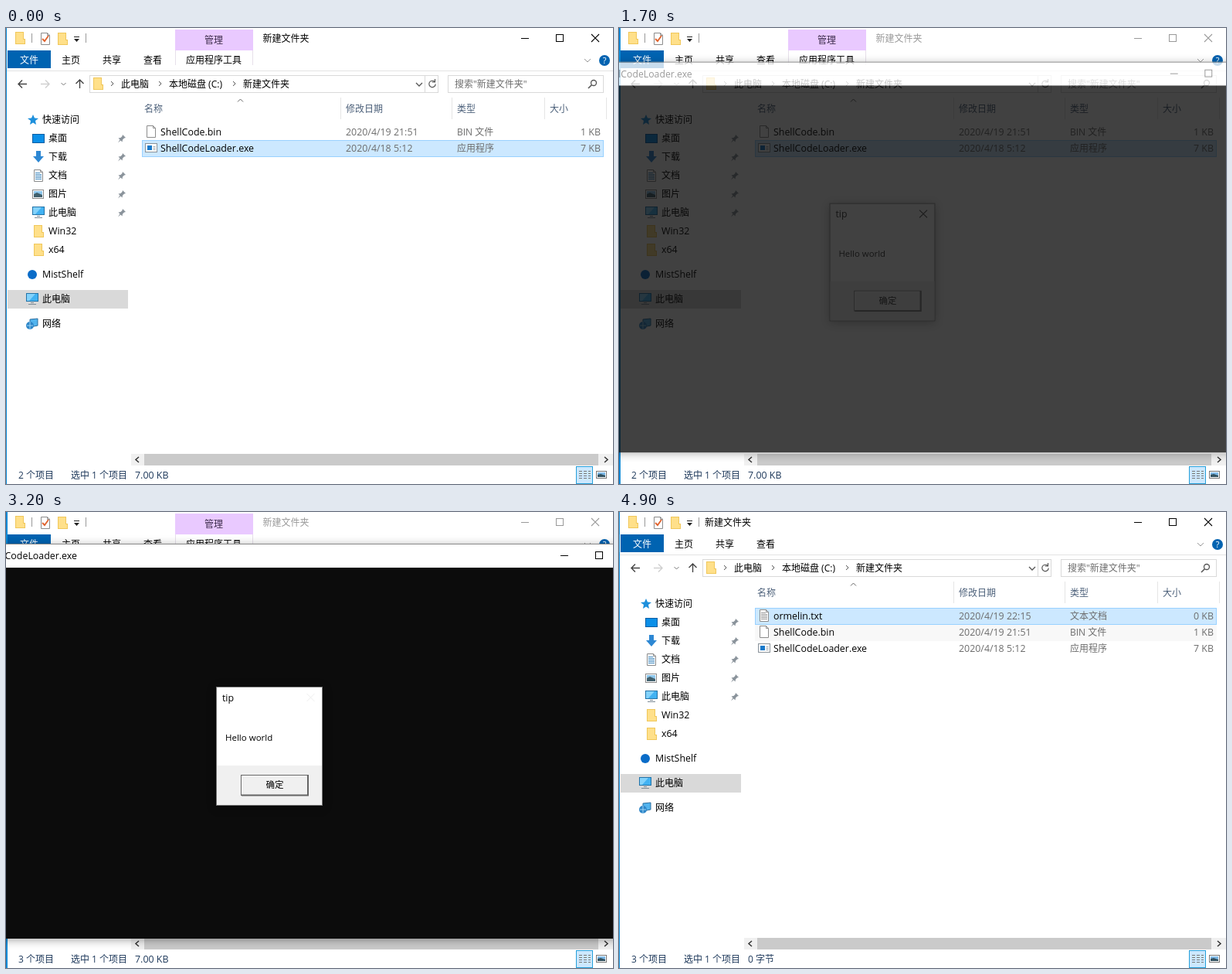
Write an HTML page that moves like this. It is 786 px wide and 590 px high and loops after 5.2 s.

```html
<!DOCTYPE html>
<html lang="zh-CN">
<head>
<meta charset="utf-8">
<style>
html, body { margin: 0; width: 100%; height: 100%; overflow: hidden; background: #fff; }
svg { display: block; }
text { font-family: "Open Sans", "Noto Sans CJK SC", "Noto Sans CJK", sans-serif; }
.window { filter: drop-shadow(0 2px 6px rgba(0, 0, 0, .35)); }
</style>
</head>
<body>
<svg id="stage" width="786" height="590" viewBox="0 0 786 590">
  <g id="explorer"></g>
  <g id="live"></g>
  <g id="tooltip"></g>
  <g id="dialog" class="window"></g>
  <g id="console" class="window"></g>
</svg>
<script>
const $ = id => document.getElementById(id);
const GREY = '#6d6d6d', BLUE = '#0063b1', NAVY = '#1e395b', HEAD = '#4c607a';

// Drawing helpers: text is placed by its vertical middle
const text = (x, y, s, fill = '#000', anchor = 'start', size = /[^\x00-\x7f]/.test(s) ? 12 : 12.4) =>
  `<text x="${x}" y="${y + 5}" fill="${fill}" text-anchor="${anchor}" font-size="${size}">${s}</text>`;
const rect = (x, y, w, h, fill, stroke = 'none') =>
  `<rect x="${x}" y="${y}" width="${w}" height="${h}" fill="${fill}" stroke="${stroke}"/>`;
const line = (d, stroke, width = 1) => `<path d="${d}" fill="none" stroke="${stroke}" stroke-width="${width}"/>`;
const shape = (d, fill) => `<path d="${d}" fill="${fill}"/>`;
const at = (x, y, s) => `<g transform="translate(${x} ${y})">${s}</g>`;
const cross = (x, y, color) => line(`M${x - 5} ${y - 5}l10 10m0 -10l-10 10`, color, 1.1);
const minMax = (x, y, color) =>
  line(`M${x} ${y + .5}h10`, color) + rect(x + 45.5, y - 4.5, 9, 9, 'none', color);

// Icons
const folder = (x, y) => at(x, y,
  shape('M0 0h11v9h2v7h-13z', '#f0c75a') + shape('M1 1h9v9h2v5h-11z', '#ffe08a'));
const page = (x, y, lines = '') => at(x, y,
  shape('M.5 .5h8l3 3v12h-11z', '#fff') + line('M.5 .5h8l3 3v12h-11zM8.5 .5v3h3', '#8c8c8c') +
  (lines && line('M2 4.5h6M2 6.5h8M2 8.5h8M2 10.5h8M2 12.5h8', lines)));
const screen = (x, y) => at(x, y,
  rect(.5, .5, 15, 10, '#42b2f2', '#2273a8') + shape('M1 1h11l-8 9h-3z', '#83d2fb') + line('M6 12.5h4M3 14.5h10', '#7d8b96'));
const picture = (x, y) => at(x, y,
  rect(.5, .5, 14, 11, '#fff', '#8a8a8a') + rect(2, 2, 11, 8, '#8dc6ec') + shape('M2 6l4 -2 7 3v3h-11z', '#41606d'));
const app = (x, y) => at(x, y,
  rect(.5, .5, 15, 11, '#fff', '#8a9299') + rect(3, 3, 6, 6, '#1979ca') + line('M10.5 4.5h3M10.5 6.5h3M10.5 8.5h3', '#9aa5ad'));
const pin = y => at(150, y, shape('M1 -5l4 4 -2 .5 -2 2 -.5 3 -2 -2 -3.5 3 2.5 -4 -2 -2 3 -.5 2 -2z', '#8a939b'));

function explorerBase() {
  const tabs = ['主页', '共享', '查看'].map((s, i) => text(72 + 53 * i, 41, s)).join('');
  const crumbs = [[149, '此电脑'], [211, '本地磁盘 (C:)'], [307, '新建文件夹']]
    .map(([x, s]) => line(`M${x - 13} 69l3 3 -3 3`, '#555') + text(x, 72, s)).join('');
  const heads = [[179, '名称', 433], [440, '修改日期', 577], [584, '类型', 697], [704, '大小', 777]]
    .map(([x, s, edge]) => text(x, 104, s, HEAD) + rect(edge, 90, 1, 28, '#e5e5e5')).join('');
  const places = ['桌面', '下载', '文档', '图片', '此电脑', 'Win32', 'x64']
    .map((s, i) => text(55, 142 + 24 * i, s) + (i < 5 ? pin(143 + 24 * i) : '')).join('');
  return rect(0, 0, 786, 590, '#fff') +
    folder(12, 5) + rect(33, 7, 1, 12, '#999') + page(45, 6) + line('M47 14l3 3 5 -7', '#e0622c', 1.8) + folder(67, 6) +
    rect(88, 11, 7, 1, '#222') + shape('M88 14h7l-3.5 4z', '#222') + rect(103, 7, 1, 12, '#999') +
    rect(2, 29, 56, 23, BLUE) + text(18, 41, '文件', '#fff') + tabs +
    line('M749 40l4 4 4 -4', '#999') + `<circle cx="775" cy="42" r="7" fill="${BLUE}"/>` +
    text(775, 41, '?', '#fff', 'middle', 11) + rect(1, 55, 785, 1, '#e4e4e4') +
    line('M27 72.5h-11m5 -5l-5 5 5 5', '#444', 1.4) + line('M45 72.5h11m-5 -5l5 5 -5 5', '#d0d0d0', 1.4) +
    line('M71.5 71l3 3 3 -3', '#777') + line('M95.5 78v-11m-5 5l5 -5 5 5', '#444', 1.4) +
    rect(108.5, 61.5, 451, 22, '#fff', '#d9d9d9') + rect(542, 62, 1, 21, '#d9d9d9') + folder(113, 64) + crumbs +
    line('M531 71l4 4 4 -4', '#555', 1.3) + line('M555 69.5a4.2 4.2 0 1 0 1.2 3M555.5 66v4h-4', '#555', 1.2) +
    rect(572.5, 61.5, 201, 22, '#fff', '#d9d9d9') + text(581, 72, '搜索"新建文件夹"', GREY) +
    `<circle cx="761" cy="71" r="3.5" fill="none" stroke="#555" stroke-width="1.3"/>` + line('M758.5 73.5l-4.5 4.5', '#555', 1.6) +
    heads + line('M300 95.5l3.5 -3.5 3.5 3.5', '#666') +
    shape('M35 112l2 4.5 5 .5 -4 3 1 5 -4 -2.5 -4 2.5 1 -5 -4 -3 5 -.5z', '#1e90dc') + text(47, 118, '快速访问') + places +
    rect(34.5, 137.5, 15, 11, '#0b8fe8', '#0b5ea3') + shape('M39 159h6v7h4l-7 8 -7 -8h4z', '#2d87d3') +
    page(36, 183, '#4a90c4') + picture(34, 209) + screen(34, 231) + folder(36, 255) + folder(36, 279) +
    `<circle cx="34" cy="319" r="6" fill="#0a6cc8"/>` + text(47, 318, 'MistShelf') +
    rect(2, 339, 156, 24, '#d9d9d9') + screen(26, 343) + text(47, 350, '此电脑') +
    at(26, 376, shape('M5 1l10 -1v9l-10 2z', '#52b4ee') + line('M5 1l10 -1v9l-10 2z', '#2c6f9f') +
      `<circle cx="5" cy="9" r="5" fill="#2e86c8"/>` + line('M1 9h8M5 4v10', '#9ad3f5')) + text(47, 382, '网络') +
    rect(162, 551, 624, 15, '#f0f0f0') + rect(179, 551, 588, 15, '#cacaca') +
    line('M172 555l-4 3.5 4 3.5M775 555l4 3.5 -4 3.5', '#333', 1.5) +
    rect(738.5, 567.5, 21, 22, '#cce8ff', '#26a0da') +
    line('M742 573.5h4M742 576.5h4M742 579.5h4M742 582.5h4M748 573.5h4M748 576.5h4M748 579.5h4M748 582.5h4M754 573.5h3M754 576.5h3M754 579.5h3M754 582.5h3', '#777') +
    at(764, 573, rect(.5, .5, 13, 9, '#fff', '#777') + rect(2, 2, 10, 6, '#7fb9e6') + shape('M2 5l4 -1 6 2v2h-10z', '#335260'));
}

const files = [
  ['ormelin.txt', '2020/4/19 22:15', '文本文档', '0 KB', y => page(182, y - 8, '#999')],
  ['ShellCode.bin', '2020/4/19 21:51', 'BIN 文件', '1 KB', y => page(182, y - 8)],
  ['ShellCodeLoader.exe', '2020/4/18 5:12', '应用程序', '7 KB', y => app(180, y - 6)],
];

function fileRow([name, date, type, size, icon], i, s) {
  const y = 134 + 21 * i;
  const back = i === s.selected ? rect(176.5, y - 9.5, 597, 21, '#cce8ff', '#99d1ff')
    : i === s.hover ? rect(176, y - 10, 598, 22, s.hoverFill) : '';
  return back + icon(y) + text(200, y, name) + text(440, y, date, GREY) + text(584, y, type, GREY) + text(770, y, size, GREY, 'end');
}

function explorerLive(s) {
  const ink = s.active ? '#000' : '#999';
  const tool = s.toolTab ? rect(219, 2, 101, 27, '#e9c9ff') + text(257, 15, '管理', '#3b2a4a') +
    line('M219.5 29v19M319.5 29v19', '#e6e0ea') + text(233, 41, '应用程序工具') : '';
  // Later rows go underneath, so a selected row keeps its lower edge
  const rows = files.slice(-s.count).map((f, i) => fileRow(f, i, s)).reverse().join('');
  return rect(0, 0, s.active ? 1 : 2, 590, '#0a8ad8') + tool + text(s.toolTab ? 332.5 : 111, 13, '新建文件夹', ink) +
    minMax(667, 13, ink) + cross(763, 13, ink) + rows +
    text(16, 578, s.count + ' 个项目', NAVY) + text(84, 578, '选中 1 个项目', NAVY) + text(167, 578, s.size, NAVY);
}

function consoleWindow(s) {
  const ink = s.consoleActive ? '#000' : '#808080';
  return rect(-157, 41, 993, 511, '#0c0c0c') + rect(-157, 41, 993, 31, '#fff') + rect(-157, 41, 993, 1, '#8a8a8a') +
    text(92, 56, 'ShellCodeLoader.exe', ink, 'end') + minMax(718, 56, ink);
}

function dialogWindow(s) {
  return rect(272.5, 226.5, 137, 153, '#fff', '#777') + rect(273, 328, 136, 51, '#f0f0f0') +
    (s.closeHot ? rect(365, 227, 44, 29, '#e81123') : '') +
    text(280, 240, 'tip') + cross(394.5, 240, s.closeInk) + text(284, 291, 'Hello world', '#000', 'start', 11.5) +
    rect(304.5, 340.5, 87, 26, '#f0f0f0', '#646464') + line('M305.5 366v-24.5h84', '#fff') +
    line('M305 366.5h86v-26', '#646464', 2) + text(348, 352, '确定', '#000', 'middle', 11.5);
}

const tooltipBox = rect(293.5, 168.5, 160, 54, '#fff', '#767676') +
  ['类型: BIN 文件', '大小: 386 字节', '修改日期: 2020/4/19 21:51']
    .map((s, i) => text(297, 179 + 16 * i, s, '#575757')).join('');

// Each step changes part of the state and holds until the next
const steps = [
  [0, { active: true, toolTab: true, count: 2, selected: 1, hover: -1, hoverFill: '#e5f3ff', size: '7.00 KB',
        consoleAlpha: 0, consoleScale: 1, consoleActive: false,
        dialogAlpha: 0, dialogScale: 1, dialogFront: false, closeHot: false, closeInk: '#222', tip: 0 }],
  [1500, { active: false }],
  [1600, { consoleAlpha: .3, consoleScale: .955, dialogAlpha: .3, dialogScale: .95 }],
  [1700, { consoleAlpha: .78, consoleScale: .989, dialogAlpha: .78, dialogScale: .992 }],
  [1800, { consoleAlpha: 1, consoleScale: 1, dialogAlpha: .93, dialogScale: 1, dialogFront: true }],
  [1900, { dialogAlpha: 1 }],
  [2500, { count: 3, selected: 2 }],
  [3100, { closeHot: true, closeInk: '#fff' }],
  [3200, { closeHot: false, closeInk: '#f4f4f4', consoleActive: true }],
  [3300, { active: true, consoleAlpha: .45, consoleScale: .96, dialogAlpha: 0 }],
  [3400, { consoleAlpha: 0 }],
  [3800, { hover: 1 }],
  [4100, { hover: 0 }],
  [4200, { selected: 0, hover: -1, toolTab: false, size: '0 字节' }],
  [4500, { hover: 1 }],
  [4600, { tip: .5 }],
  [4700, { tip: 1 }],
  [4800, { tip: .5 }],
  [4900, { tip: 0, hoverFill: '#f8f8f8' }],
];

function place(el, alpha, scale, cx, cy) {
  el.setAttribute('opacity', alpha);
  el.setAttribute('display', alpha ? 'inline' : 'none');
  el.setAttribute('transform', `translate(${cx} ${cy}) scale(${scale}) translate(${-cx} ${-cy})`);
}

function render(s) {
  $('live').innerHTML = explorerLive(s);
  $('console').innerHTML = consoleWindow(s);
  $('dialog').innerHTML = dialogWindow(s);
  place($('console'), s.consoleAlpha, s.consoleScale, 339, 297);
  place($('dialog'), s.dialogAlpha, s.dialogScale, 341, 303);
  place($('tooltip'), s.tip, 1, 0, 0);
  $('stage').append($(s.dialogFront ? 'dialog' : 'console'));
}

$('explorer').innerHTML = explorerBase();
$('tooltip').innerHTML = tooltipBox;

const start = performance.now();
let shown = 0;
function tick() {
  const time = Math.max(0, performance.now() - start) % 5200;
  const past = steps.filter(([from]) => from <= time);
  if (past.length !== shown) {
    shown = past.length;
    render(Object.assign({}, ...past.map(([, change]) => change)));
  }
  requestAnimationFrame(tick);
}
tick();
</script>
</body>
</html>
```
